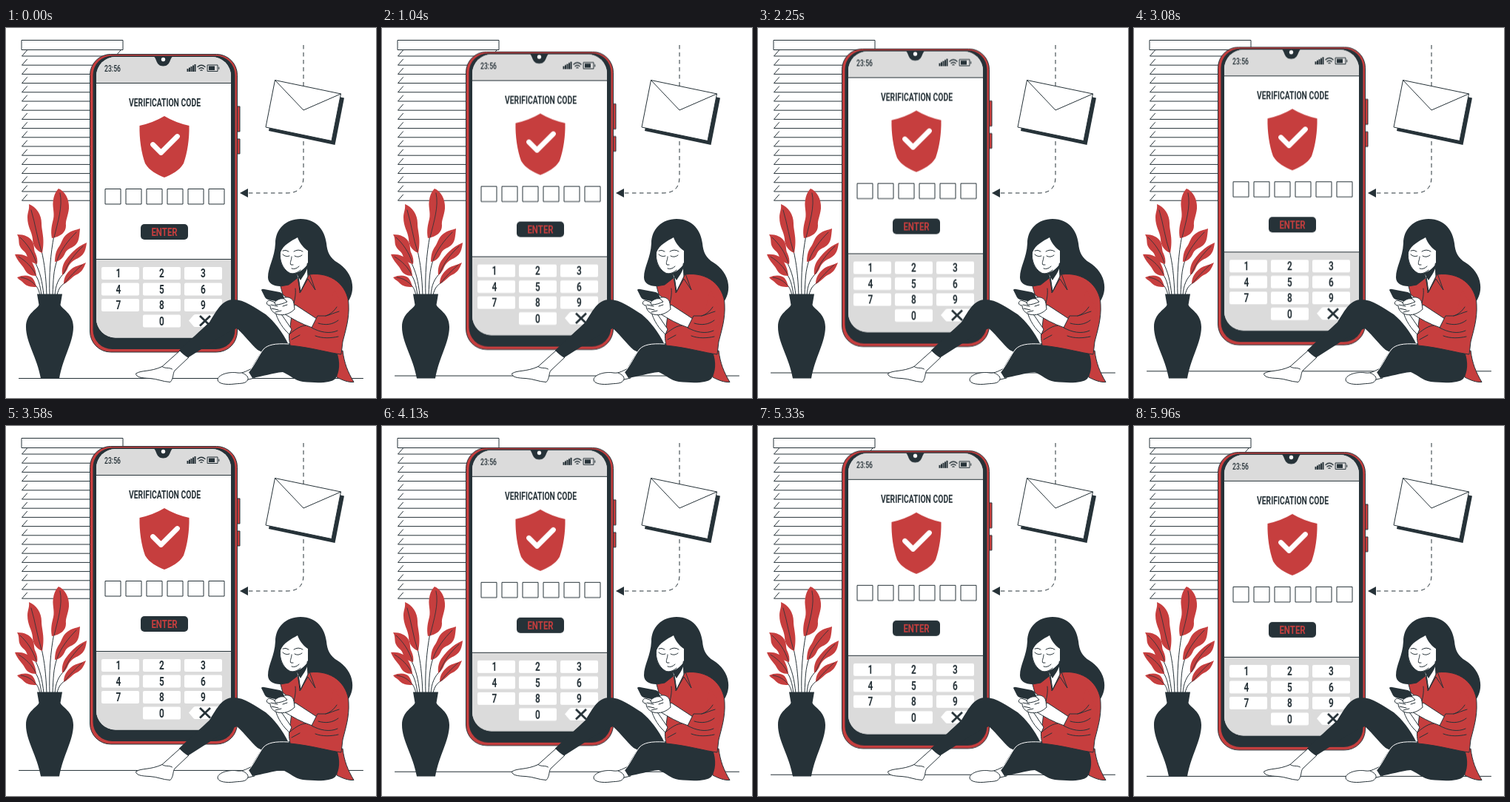
An HTML page for the animation above (6000 ms loop, 500 by 500 pixels).

```html
<!DOCTYPE html>
<html lang="en">
<head>
<meta charset="utf-8">
<title>Verification code</title>
<style>
  html, body { margin: 0; width: 100%; height: 100%; overflow: hidden; background: #fff; }
  svg { display: block; width: 100%; height: 100%; --ink: #263238; --red: #c63e3e; --grey: #dbdbdb; }
  .ink { fill: var(--ink); }
  .red { fill: var(--red); }
  .grey { fill: var(--grey); }
  .white { fill: #fff; }
  .edge { stroke: var(--ink); stroke-width: 1; stroke-linejoin: round; }
  .line { fill: none; stroke: var(--ink); stroke-width: 1; stroke-linecap: round; stroke-linejoin: round; }
  text {
    font: 700 16px Roboto, "Liberation Sans", sans-serif;
    text-anchor: middle; fill: var(--ink);
    transform-box: fill-box; transform-origin: center; transform: scaleX(.74);
  }
  .float { animation: float 3s linear infinite alternate; }
  @keyframes float { to { transform: translateY(-10px); } }
</style>
</head>
<body>
<svg viewBox="0 0 500 500">
  <g id="blinds">
    <path class="white edge" d="M21 16.5H158V29.5H21Z"/>
  </g>

  <path class="line" stroke-dasharray="5.500 4.500" style="stroke-linecap:butt" d="M402 23V201Q402 223 380 223H326"/>
  <path class="ink" d="M316 223L327 217V229Z"/>

  <g id="envelope">
    <path class="ink" d="M367 75L457 94.5L444.500 158L355 139Z"/>
    <path class="white edge" d="M363.500 70.500L452.500 89L440 152.500L351 134Z"/>
    <path class="line" d="M363.500 70.500L402 111L452.500 89"/>
  </g>

  <path class="line float" d="M17.500 473.500H482.500"/>

  <g id="phone" class="float">
    <path class="red edge" d="M308 106H316V140H308ZM308 150H316V170H308Z"/>
    <rect class="red edge" x="113.500" y="35.500" width="199" height="402.500" rx="28"/>
    <rect class="ink" x="117.500" y="37.500" width="192" height="396.500" rx="26"/>
    <clipPath id="screen"><rect x="122" y="39" width="182" height="379.500" rx="26"/></clipPath>
    <g clip-path="url(#screen)">
      <path class="white" d="M122 39H304V419H122Z"/>
      <path class="grey" d="M122 39H304V74H122ZM122 312H304V419H122Z"/>
      <path class="line" d="M122 74.500H304M122 312.500H304"/>
    </g>
    <path class="ink" d="M199 38.500C204 39.500 202 51.500 212.500 51.500C223 51.500 221 39.500 226 38.500Z"/>
    <circle class="white" cx="212.500" cy="42.500" r="2.700"/>

    <text x="144" y="58.700" style="font-size:12px;font-weight:500;transform:scaleX(.72)">23:56</text>
    <path class="ink" d="M244.500 55h2v4h-2zM247 53.500h2v5.500h-2zM249.500 52h2v7h-2zM252 50.500h2v8.500h-2zM254.500 49h2v10h-2z"/>
    <g class="line" style="stroke-width:1.400">
      <path d="M259 52.500Q264 48 269 52.500M261 55Q264 52.300 267 55M263 57.300Q264 56.500 265 57.300"/>
      <path style="stroke-width:1" d="M272.500 50H286V58.500H272.500ZM287.800 53V55.500"/>
    </g>
    <path class="ink" d="M274 51.500H282V57H274Z"/>

    <text x="214.500" y="106" style="font-size:14px">VERIFICATION CODE</text>
    <path class="red" d="M214 119Q229 128 247.500 132C248 150 245 169 240 183C234 193 224 198 214 202C204 198 194 193 188 183C183 169 180 150 180.500 132Q199 128 214 119Z"/>
    <path fill="none" stroke="#fff" stroke-width="6.800" stroke-linecap="round" stroke-linejoin="round" d="M198.500 157.500L209.500 168.500L231.500 146.500"/>

    <rect class="ink" x="182" y="265" width="64" height="21" rx="5"/>
    <text x="214" y="281" style="font-size:15.500px;fill:var(--red)">ENTER</text>

    <path class="white" d="M247 395.500L253 388.500Q254 387 256 387H290Q292 387 292 389V402Q292 404 290 404H256Q254 404 253 402.500Z"/>
    <path class="line" style="stroke-width:2.800;stroke-linecap:butt" d="M262 389L276 402.500M276 389L262 402.500"/>
  </g>

  <g id="plant">
    <path class="line" d="M51 361C49 342 46 330 40 318M55 361C54 335 52 318 48 301M59 361C58 335 60 305 65 280M63 361C64 340 64 328 69 314M66 361C67 347 71 338 79 331M69 361C71 351 75 347 82 343M48 361C46 347 44 339 38 331M46 361C44 353 42 349 38 346"/>
    <path class="red" d="M71 217C79 220 86 231 85 244C84 254 80 260 81 267C81 276 74 282 62 284C60 274 62 266 64 258C66 249 62 241 64 232C65 225 68 220 71 217Z"/>
    <path class="red" d="M31 238C41 242 48 252 48 264C48 275 53 284 49 304C41 301 36 294 36 285C35 275 29 269 29 256C29 249 32 245 31 238Z"/>
    <path class="red" d="M100 271C99 281 99 289 93 294C88 298 83 298 80 304C77 311 73 315 66 316C66 307 68 300 72 295C76 289 76 283 83 278C88 274 94 273 100 271Z"/>
    <path class="red" d="M15 279C25 279 32 282 36 289C39 295 37 300 40 305C42 310 43 314 42 319C34 317 30 313 28 307C26 301 20 300 18 293C17 288 18 284 15 279Z"/>
    <path class="red" d="M12 306C22 305 30 308 34 314C37 320 40 325 41 335C33 335 28 332 25 326C22 320 16 316 12 306Z"/>
    <path class="red" d="M109 290C108 299 106 306 99 310C92 314 88 315 84 323C82 328 80 331 76 334C75 325 77 318 82 312C87 306 93 297 109 290Z"/>
    <path class="red" d="M108 317C105 325 102 330 96 333C90 335 87 341 78 346C78 337 82 331 88 326C94 321 100 321 108 317Z"/>
    <path class="red" d="M15 337C24 333 32 334 36 338C39 342 40 346 41 350C33 350 28 349 24 345C21 341 18 341 15 337Z"/>
    <path class="line" style="stroke-width:.800" d="M73 223C77 241 70 262 65 283M34 246C40 266 42 284 48 302M95 276C84 287 74 300 69 314M19 283C29 292 36 303 41 317M17 309C27 315 35 323 40 333M104 295C93 305 83 318 78 332M103 320C95 327 87 335 79 345M20 337C29 338 36 343 40 348"/>
    <path class="ink" d="M42 359.500H76L73.500 374C75 380 91 385 91 404C91 425 77 445 72 473.500H47C42 445 27 425 27 404C27 385 43 380 44.500 374Z"/>
  </g>

  <g id="woman">
    <path class="ink" d="M398 258C378 258 364 272 364 291C363 311 354 323 354 337C354 347 366 351 379 348L410 345L440 345L461 372C466 364 469 357 468 347C467 334 458 323 448 317C438 311 434 303 433 291C431 275 421 258 398 258Z"/>

    <path class="white edge" d="M175.500 467C183 462 195 465 211 457.500L235 436L247 445L228 463C225 467 227 473 222 478.500C211 478 205 474 194 473.500C183 473 176 472 175.500 467Z"/>
    <path class="line" d="M211 457.500C216 461 220 458 224.500 461"/>
    <path class="white edge" d="M335 459C325 463 321 467 313 466C302 464 287 468 286 475C286 481 298 482.500 309 481C318 480 324 481 327 475L336 473Z"/>
    <path class="line" d="M319 466C324 468 328 471 327 475"/>

    <path class="red edge" d="M445 438L455 436C457 453 462 465 470 478.500C462 479 455 476 447 472Z"/>
    <path class="ink" d="M234 435.500C248 422 264 408 275 397.500C283 385 291 367 307 367C323 367 336 378 351 387C362 396 374 411 382 428L350 440L340 435C331 427 324 417 312 406C299 411 286 419 275 427L246 445.500C242 443 237 439 234 435.500Z"/>
    <path class="ink" d="M328 465C334 457 338 447 345 438C350 430 357 427 368 427C390 423 426 432 447 438C452 451 451 466 445 474C439 480 421 480 401 478C389 476 384 469 374 465C360 466 347 471 333 473Z"/>
    <path fill="none" stroke="#fff" stroke-width="1" stroke-linecap="round" d="M328 465C337 454 341 443 348 434C354 428 363 426 382 427"/>

    <path class="red edge" d="M396 336L410 333C425 331 438 335 447 342C456 349 463 361 463 374C464 393 459 408 455 424L453 441C436 439 414 432 384 429C382 420 382 412 384 404L388 372L374 360L371 349L382 347Z"/>

    <path class="white edge" d="M392 329L407 318L408 336L398 357L394 338Z"/>
    <path class="ink" d="M392 331C399 329 404 324 408 319C408 327 403 333 398 341Z"/>
    <path class="white" d="M394 283C385 288 375 293 371 303C369 314 373 325 383 331C391 335 401 326 408 317L408 301C402 297 397 291 394 283Z"/>
    <path class="line" d="M370.500 302C369 314 374 326 383 331C388 333 394 331 398 327M374 306Q378 310 383 308M390 308Q395 311 400 307M374 301Q378 299 382 302M389 302Q395 298 401 302M386 309C386 314 383 317 385 320L388 320M386 325Q391 327 396 322"/>
    <path class="red edge" d="M395 336L397 358L408 339L418 354L410 332L398 356Z"/>

    <path class="white edge" d="M363 381L373 388L386 407L383 414C375 407 367 396 363 381Z"/>
    <path class="white edge" d="M374 385L391 374L420 393L414 405C399 400 387 393 374 385Z"/>
    <path class="red" d="M444 354C438 366 441 379 432 389L421 389L413 405C424 411 437 414 448 409C456 402 458 392 458 381Z"/>
    <path class="line" d="M450 383C443 385 437 388 432 389L421 389L413 405C424 411 437 414 448 409M432 389C438 387 443 383 447 377M422 399C432 402 441 401 449 395M384 413C391 407 399 402 405 402M386 421L397 415M391 352C392 360 390 368 388 376M449 417C440 419 428 420 418 416"/>

    <path class="white edge" d="M357 375C351 375 351 369 356 368L364 371L374 365C381 362 388 365 389 372L390 380C384 386 376 389 367 387C361 385 357 381 357 375Z"/>
    <path class="ink" d="M345 354Q346 352 349 353L370 357Q373 358 374 360L377 368Q377 371 373 371L354 367Q351 366 350 364Z"/>
    <path class="white edge" d="M363 371C366 367 371 365 376 366L380 370C375 372 371 374 364 374Z"/>
    <path class="line" d="M358 374L367 376M359 379L368 381M364 384L372 382M374 376L380 374"/>
  </g>
</svg>
<script>
  const $ = id => document.getElementById(id);
  function add(parent, tag, attrs, text = '') {
    const el = document.createElementNS('http://www.w3.org/2000/svg', tag);
    for (const key in attrs) el.setAttribute(key, attrs[key]);
    el.textContent = text;
    parent.append(el);
    return el;
  }

  for (let i = 0; i < 17; i++) {
    const y = 38 + i * 12.2;
    add($('blinds'), 'path', { class: 'line', d: `M28.500 ${y - 8}L21.500 ${y}H148L155 ${y - 8}` });
  }

  const phone = $('phone');
  for (let i = 0; i < 6; i++) {
    add(phone, 'rect', { class: 'white edge', x: 134 + i * 28, y: 217.5, width: 21, height: 20.5 });
  }

  function key(label, col, row) {
    const x = 129 + col * 56, y = 323 + row * 21.5;
    add(phone, 'rect', { class: 'white', x, y, width: 51, height: 17, rx: 2 });
    add(phone, 'text', { x: x + (col ? 25.5 : 23), y: y + 14.2 }, label);
  }
  for (let n = 0; n < 9; n++) key(n + 1, n % 3, Math.floor(n / 3));
  key(0, 1, 3);
</script>
</body>
</html>
```
